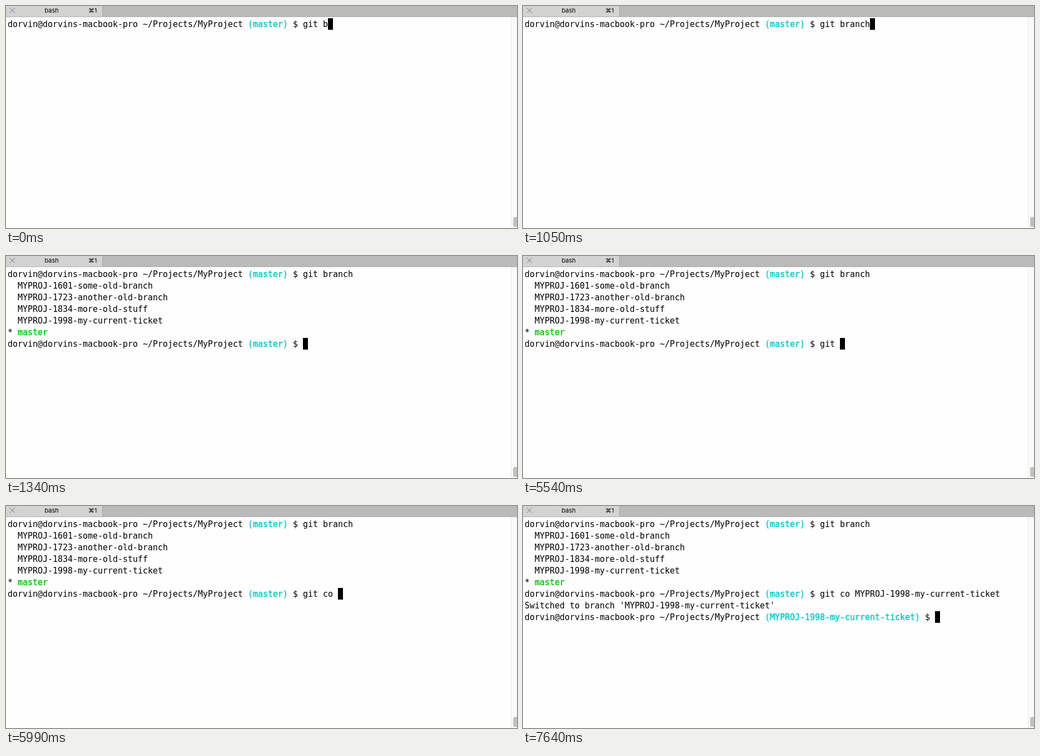
Recreate the animation shown at these times as an HTML page with a canvas. Size 919 by 401 pixels, loop 8000 ms.

```html
<!DOCTYPE html>
<html lang="en">
<head>
<meta charset="utf-8">
<title>Terminal: switching branches</title>
<style>
  html, body { margin: 0; width: 100%; height: 100%; overflow: hidden; background: #fefefe; }
  canvas { display: block; }
</style>
</head>
<body>
<canvas id="stage" width="919" height="401"></canvas>
<script>
const ctx = document.getElementById('stage').getContext('2d');
const LOOP = 8000;
const CELL = 9, LINE = 21, LEFT = 3, TOP = 22, BASELINE = 16;
const BLACK = '#000', CYAN = '#00c5c7', GREEN = '#00c200';
const TICKET = 'MYPROJ-1998-my-current-ticket';

// Each entry: start time in ms, number of finished commands, text being typed.
const STEPS = [
  [0, 0, 'git b'],
  [300, 0, 'git br'],
  [600, 0, 'git bra'],
  [750, 0, 'git bran'],
  [900, 0, 'git branc'],
  [1050, 0, 'git branch'],
  [1340, 1, ''],
  [5240, 1, 'g'],
  [5390, 1, 'git'],
  [5540, 1, 'git '],
  [5840, 1, 'git c'],
  [5990, 1, 'git co '],
  [6290, 1, 'git co ' + TICKET],
  [7640, 2, '']
];

// A line is a list of [text, colour] spans.
const prompt = (branch, command) => [
  ['dorvin@dorvins-macbook-pro ~/Projects/MyProject ', BLACK],
  [`(${branch})`, CYAN],
  [' $ ' + command, BLACK]
];

const HISTORY = [
  [
    prompt('master', 'git branch'),
    [['  MYPROJ-1601-some-old-branch', BLACK]],
    [['  MYPROJ-1723-another-old-branch', BLACK]],
    [['  MYPROJ-1834-more-old-stuff', BLACK]],
    [['  ' + TICKET, BLACK]],
    [['* ', BLACK], ['master', GREEN]]
  ],
  [
    prompt('master', 'git co ' + TICKET),
    [[`Switched to branch '${TICKET}'`, BLACK]]
  ]
];

function rect(color, x, y, w, h) {
  ctx.fillStyle = color;
  ctx.fillRect(x, y, w, h);
}

function drawWindow() {
  rect('#fefefe', 0, 0, 919, 401);
  rect('#bababa', 0, 0, 919, 20);
  rect('#d3d3d3', 0, 0, 173, 19);
  rect('#a9a9a9', 173, 0, 1, 20);
  rect('#b0b0b0', 0, 19, 919, 1);

  ctx.strokeStyle = '#777';
  ctx.lineWidth = 1;
  ctx.beginPath();
  ctx.moveTo(7, 3.5);
  ctx.lineTo(16, 12.5);
  ctx.moveTo(16, 3.5);
  ctx.lineTo(7, 12.5);
  ctx.stroke();

  ctx.fillStyle = BLACK;
  ctx.font = '11px Inter, sans-serif';
  ctx.fillText('bash', 69.5, 12);
  ctx.fillText('⌘1', 148, 12);

  rect('#fafafa', 908, 20, 11, 381);
  rect('#e8e8e8', 908, 20, 1, 381);
  ctx.fillStyle = '#c1c1c1';
  ctx.beginPath();
  ctx.roundRect(912, 381, 8, 18, 3.5);
  ctx.fill();
}

// Draws one line on the character grid and returns the column after it.
function drawLine(spans, row) {
  let column = 0;
  for (const [text, color] of spans) {
    ctx.fillStyle = ctx.strokeStyle = color;
    ctx.lineWidth = 0.35;
    for (const char of text) {
      const x = LEFT + column++ * CELL, y = TOP + row * LINE + BASELINE;
      ctx.fillText(char, x, y);
      if (color !== BLACK) ctx.strokeText(char, x, y);
    }
  }
  return column;
}

function draw(time) {
  const [, finished, typed] = STEPS.findLast(([start]) => start <= time);
  const branch = finished === 2 ? TICKET : 'master';
  const lines = [...HISTORY.slice(0, finished).flat(), prompt(branch, typed)];

  drawWindow();
  ctx.font = '15px "DejaVu Sans Mono", monospace';
  let column = 0;
  lines.forEach((line, row) => { column = drawLine(line, row); });
  rect(BLACK, LEFT + column * CELL, TOP + (lines.length - 1) * LINE, CELL, LINE);
}

function tick() {
  draw(performance.now() % LOOP);
  requestAnimationFrame(tick);
}
tick();
</script>
</body>
</html>
```
